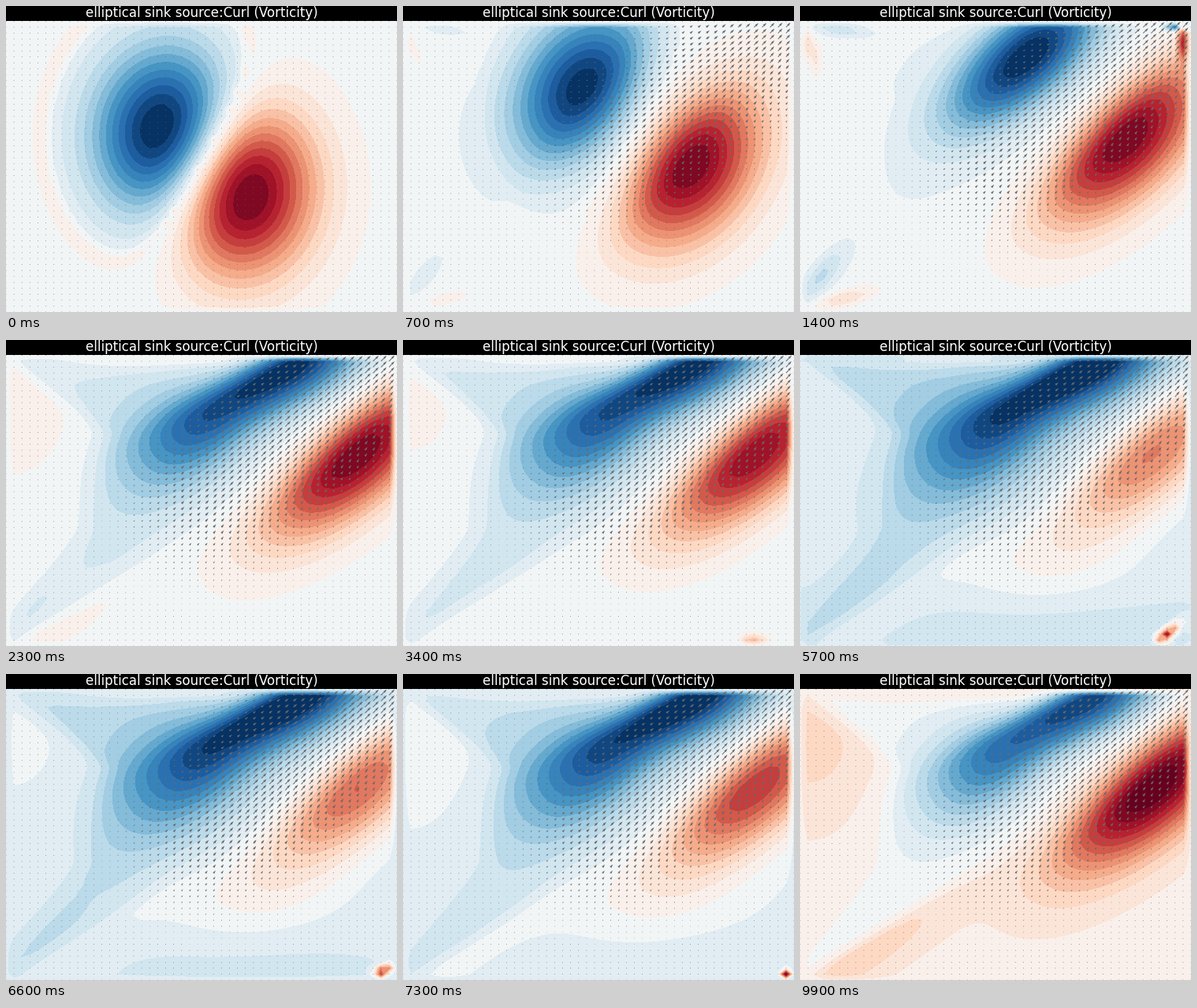
Recreate the animation shown at these times as a matplotlib script. Size 496 by 389 pixels, loop 10000 ms.

```python
import numpy as np
import matplotlib.pyplot as plt
from matplotlib.animation import FuncAnimation

W, H, DPI = 496, 389, 100
FRAMES, STEP = 100, 100
TOP = H * 0.05

X, Y = np.meshgrid(np.linspace(0, W, 50), np.linspace(TOP, H, 50))
INNER = np.zeros_like(X)
INNER[1:-1, 1:-1] = 1
LEVELS = np.linspace(-1.03, 1.05, 27)


def ramp(t, start, end):
    u = np.clip((t - start) / (end - start), 0, 1)
    return u * u * (3 - 2 * u)


def bump(t, mid, half):
    u = np.clip((t - mid) / half, -1, 1)
    return np.cos(u * np.pi / 2) ** 2


def mix(a, b, w):
    return np.array(a) * (1 - w) + np.array(b) * w


def sig(u):
    return 1 / (1 + np.exp(-np.clip(u, -50, 50)))


def blob(amp, cx, cy, deg, back, front, up, down):
    """Rotated Gaussian with its own width on each of four sides."""
    c, s = np.cos(np.radians(deg)), np.sin(np.radians(deg))
    a = (X - cx) * c - (Y - cy) * s
    b = (X - cx) * s + (Y - cy) * c
    a = a / np.where(a < 0, back, front)
    b = b / np.where(b < 0, up, down)
    return amp * np.exp(-(a * a + b * b) / 2)


def oval(amp, cx, cy, deg, rx, ry):
    return blob(amp, cx, cy, deg, rx, rx, ry, ry)


def dipole(t):
    """Curl of an elliptical Gaussian push, drifting with the flow."""
    rx, ry = X - 251 - 69 * t, Y - 198 + 61 * t
    s = (rx * .874 + ry * .485) / 73.4
    q = ((rx - 59 * s) * .485 - (ry - 45 * s) * .874) / 73
    v = s * np.exp(.5 - (s * s + q * q) / 2)
    return v + .12 * np.exp(-((v + .05) / .025) ** 2)


def lobes(t, pulse):
    """Blue and red lobes sliding along the jet and stretching to rest."""
    w = np.sin(np.pi / 2 * min(t / 2.6, 1))
    blue = mix((58, 75, 75, 62, 40), (27, 95, 80, 18, 34), w * w)
    red = mix((58, 75, 75, 40, 62), (41, 100, 95, 29, 42), w)
    v = blob(-1, 195 + 170 * w * w, 153 - 121 * w, *blue)
    v += blob(1 - .35 * pulse, 312 + 134 * w, 242 - 98 * w, *red)
    return v + blob(-.5 * ramp(t, 1.2, 2.4), 235, 125, 40, 70, 60, 52, 44)


edge = np.interp(Y, [19, 120, 240, 389], [0, 130, 100, -20])
right_of = sig((X - edge) / 8)
WAKE = (right_of * sig((380 - .628 * (X - 15) - Y) / 8)
        * sig((Y - 23 - .1 * X) / 6)
        * np.exp(-(np.maximum(X - 130, 0) / 90) ** 2))
LEFT = (1 - right_of) * oval(1, 10, 90, 0, 70, 70)
UNDER = blob(1, 60, 365, 32, 40, 120, 8, 25)
CEILING = oval(1, 240, 24, 0, 70, 6)
FLOOR = oval(1, 300, 375, 0, 140, 35)
MIDDLE = oval(1, 290, 285, 0, 110, 40)
EDDIES = (oval(-.2, 50, 30, -5, 24, 5) + oval(-.22, 28, 342, 52, 28, 10)
          + oval(.2, 14, 55, -75, 18, 5) + oval(.2, 55, 372, 15, 25, 6))
BURST = oval(-.9, 475, 26.5, 0, 8, 3) + oval(.7, 487, 45, 90, 14, 4)


def backdrop(t, pulse, late):
    settled = ramp(t, 1, 2.4)
    v = settled * (.08 * LEFT - .12 * WAKE + .06 * UNDER + .12 * CEILING)
    v += pulse * (.11 * MIDDLE - .06 * FLOOR)
    v += late * (.06 * LEFT + .04 * WAKE + .12 * UNDER)
    return v + bump(t, 1.4, 1.2) * EDDIES + bump(t, 1.4, .5) * BURST


def corner_eddy(t, pulse):
    u = np.clip((t - 4.4) / 2.9, 0, 1)
    swing = np.sin(np.pi * u)
    length = 14 - 10 * u + 6 * swing
    return blob(1.1 * min(1, 2 * pulse), 442 + 44 * u, 381 - 4 * swing,
                42 * swing, 9 - 5 * u, length, 5 - 2 * u, 4)


def curl(t):
    pulse = bump(t, 5.75, 3.25)
    late = ramp(t, 7.5, 9.9)
    w = ramp(t, 0, 1.1)
    v = w * lobes(t, pulse) + (1 - w) * dipole(t)
    v += backdrop(t, pulse, late) + corner_eddy(t, pulse)
    base = -.03 - .12 * pulse + .09 * late
    return np.clip(base + INNER * v, -1.02, 1.04)


def jet():
    dx, dy = X - 350, Y - 130
    across = dx * .616 + dy * .788
    along = dx * .788 - dy * .616
    speed = 7.5 * (np.exp(-(across / 75) ** 2) * sig((along + 130) / 50)
                   + .4 * np.exp(-(across / 170) ** 2) * sig((along + 200) / 50))
    ang = np.radians(np.clip(46 + .12 * across, 10, 85))
    return INNER * speed * np.cos(ang), INNER * speed * np.sin(ang)


fig = plt.figure(figsize=(W / DPI, H / DPI), dpi=DPI, facecolor="black")
ax = fig.add_axes([0, 0, 1, 0.95])
ax.set_xlim(0, W)
ax.set_ylim(H, TOP)
ax.axis("off")
ax.set_title("elliptical sink source:Curl (Vorticity)", color="white",
             fontsize=12, family="DejaVu Sans", pad=4)

U, V = jet()
arrows = ax.quiver(X, Y, U * 0, V * 0, color="dimgray", units="width",
                   scale=W, scale_units="width", width=.002, zorder=3)
fill = None


def update(i):
    global fill
    t = i * STEP / 1000
    if fill is not None:
        fill.remove()
    fill = ax.contourf(X, Y, curl(t), levels=LEVELS, cmap="RdBu_r",
                       vmin=-1, vmax=1, zorder=1)
    k = 1 - np.exp(-2.2 * t)
    arrows.set_UVC(U * k, V * k)
    return fill, arrows


anim = FuncAnimation(fig, update, frames=FRAMES, interval=STEP,
                     init_func=lambda: update(0), repeat=True, repeat_delay=0)
plt.show()
```
